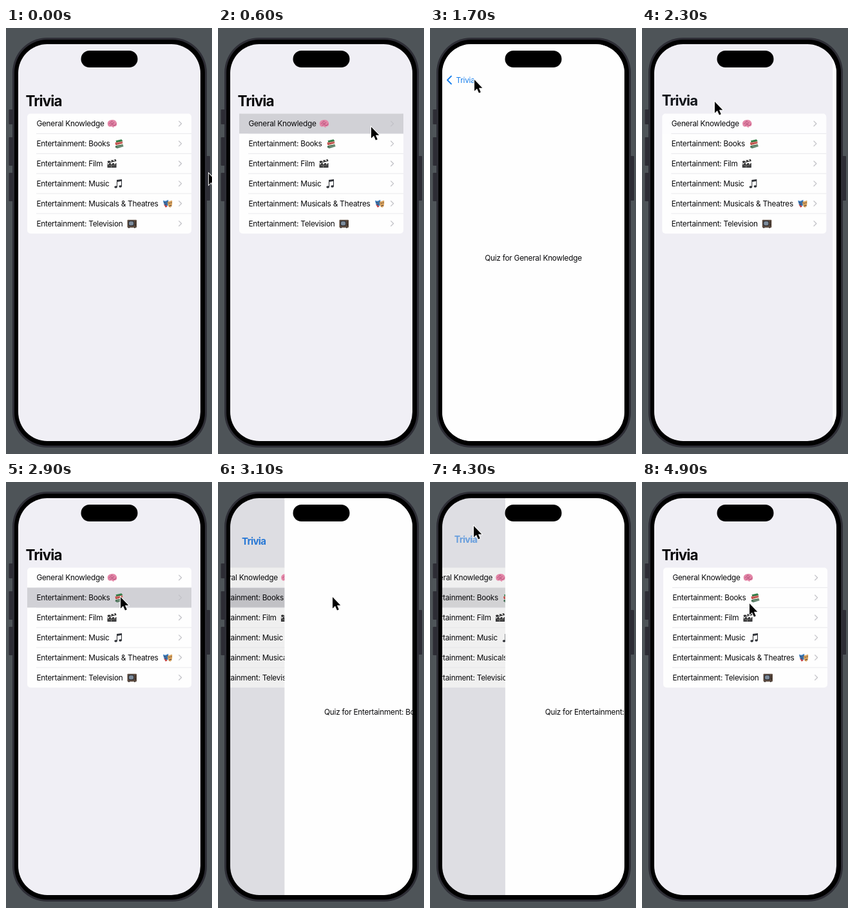
Animation of 320x659 px, one loop 5000 ms. Source, as an HTML page:

```html
<!DOCTYPE html>
<html lang="en">
<head>
<meta charset="utf-8">
<title>Trivia</title>
<style>
  html, body { margin: 0; width: 100%; height: 100%; overflow: hidden; background: #4e5458; }
  svg { display: block; width: 100%; height: 100%; }
  text { font: 400 11.8px Inter, "Liberation Sans", sans-serif; letter-spacing: -.24px; fill: #08080a; }
  #quizText { text-anchor: middle; }
  #large { font-weight: 700; font-size: 22.5px; letter-spacing: -.95px; }
  #back { fill: #147dec; }
  .line { fill: none; stroke-linecap: round; stroke-linejoin: round; }
</style>
</head>
<body>
<svg viewBox="0 0 320 659">
  <defs>
    <clipPath id="screen"><rect x="19" y="25" width="283" height="614" rx="45"/></clipPath>

    <g id="brain">
      <path d="M-7 1C-8-3-5-6-1-6C4-7 8-3 7 1C7 4 4 4 3 4L2 6L-1 4C-4 5-7 4-7 1Z" fill="#e487a8"/>
      <path class="line" d="M-5 0Q-3-3-1-1T3-2M-3 2Q0 0 2 2T6 0M-2-4Q0-5 1-3" stroke="#b04a75"/>
    </g>
    <g id="books">
      <path d="M-5-5L4-7L6-4L-4-2Z" fill="#33804a"/>
      <path d="M-6-2L5-4L6-1L-5 2Z" fill="#bd3f3c"/>
      <path d="M-4 2L6-1V2L-4 4Z" fill="#e2dccb"/>
      <path d="M-5 3L6 1L7 4L-3 7L-6 5Z" fill="#3d6a50"/>
      <path class="line" d="M-4-1L5-3M-3 5L6 3" stroke="#e6e0d0" stroke-width=".6"/>
    </g>
    <g id="film">
      <path d="M-7-4L6-7L7-4L-6-1Z" fill="#2c2c2e"/>
      <path d="M-7-1H7V6H-7Z" fill="#343436"/>
      <path d="M-4-5l2 2 2-.5-2-2zM1-6l2 2 2-.5-2-2zM-6-1l-1 2h2l1-2zM-1-1l-1 2h2l1-2zM4-1l-1 2h2l1-2z" fill="#eeeeea"/>
      <path class="line" d="M-5 3H5M-1 3V6" stroke="#a5a5a0" stroke-width=".7"/>
    </g>
    <g id="music" fill="#2f3238">
      <path d="M-2-6L6-7V4H5V-4L-1-3V5H-2Z"/>
      <ellipse cx="-3.4" cy="5" rx="2.3" ry="1.7"/>
      <ellipse cx="3.6" cy="4" rx="2.3" ry="1.7"/>
    </g>
    <g id="masks">
      <path d="M-7-5Q-3-3 1-6Q3 3-2 4Q-6 3-7-5Z" fill="#3c7fc0"/>
      <path d="M0-3Q4-4 7-5Q8 4 4 6Q0 5 0-3Z" fill="#dba45c"/>
      <path d="M-6 1L-3 6L0 4Z" fill="#c23c40"/>
      <path class="line" d="M-5-2l2 .4M-1-2.4l1-.4M-4 1Q-2 2-1 0M2-1l1 .3M5-1.4l1-.4M2.500 3.500Q4 1.500 6 3" stroke="#3a2830" stroke-width=".9"/>
    </g>
    <g id="tv">
      <rect x="-7" y="-6" width="14.500" height="12" rx="1" fill="#5e4c40"/>
      <rect x="-5.500" y="-4.500" width="9" height="8" rx="2" fill="#2c2e34"/>
      <rect x="-4.500" y="-3.500" width="7" height="6" rx="2" fill="#7d8c9c"/>
      <path class="line" d="M5.500-3v1M5.500 0v3M-5 6h1M4 6h1" stroke="#29221f" stroke-width="1.300"/>
    </g>
  </defs>

  <rect width="320" height="659" fill="#4e5458"/>
  <g fill="#2d2d35">
    <rect x="4.500" y="126" width="6" height="23" rx="1"/>
    <rect x="4.500" y="169" width="6" height="44" rx="1"/>
    <rect x="4.500" y="224" width="6" height="44" rx="1"/>
    <rect x="311" y="198" width="6" height="69" rx="1"/>
    <rect x="10" y="15" width="302" height="634" rx="54"/>
  </g>
  <rect x="13" y="18" width="296" height="628" rx="51"/>

  <g clip-path="url(#screen)">
    <rect id="bg" x="19" y="25" width="283" height="614"/>
    <g id="list">
      <rect id="card" x="33" y="132.500" width="255" height="185.400" rx="5"/>
      <rect id="press" x="33" width="255" height="30.900"/>
      <g id="rows"></g>
    </g>
    <g id="quiz">
      <rect x="19" y="25" width="283" height="614" fill="#fefefe"/>
      <text id="quizText" x="160.500" y="360"></text>
    </g>
    <path id="chevron" class="line" d="M33 74.500L27 80.500L33 86.500" stroke="#147dec" stroke-width="1.800"/>
    <g id="title">
      <text id="large">Trivia</text>
      <text id="back">Trivia</text>
    </g>
  </g>
  <rect x="116.500" y="35" width="88" height="26" rx="13"/>

  <path id="cursor" d="M0 0V17.500L4 13.700L7 20.500L9.800 19.300L6.900 12.700H12.300Z" stroke="#fff" stroke-width="1.800" paint-order="stroke"/>
</svg>

<script>
const $ = id => document.getElementById(id);
const LOOP = 5000, STEP = 100, WIDTH = 283, TOP = 132.5, PITCH = 30.9;

// label, icon, icon centre
const topics = [
  ['General Knowledge', 'brain', 165],
  ['Entertainment: Books', 'books', 175.5],
  ['Entertainment: Film', 'film', 164.5],
  ['Entertainment: Music', 'music', 174],
  ['Entertainment: Musicals &amp; Theatres', 'masks', 251],
  ['Entertainment: Television', 'tv', 195.5]
];

const visits = [
  { row: 0, push: 611, pop: 1976 },
  { row: 1, push: 2964, pop: 4232 }
];

// time, x, y, linear
const path = [
  [0, 315, 225], [450, 238, 153], [1000, 238, 153], [1550, 69, 80], [2050, 69, 80],
  [2300, 113, 114, 1], [2600, 178, 178, 1], [3250, 178, 178], [3800, 68, 68],
  [4700, 68, 68], [4800, 86, 89, 1], [4900, 167, 188, 1], [5000, 167, 188]
];

$('rows').innerHTML = topics.map(([label, icon, x], i) => {
  const y = TOP + PITCH * (i + .5);
  const rule = i ? `<path d="M47 ${y - PITCH / 2}H288" stroke="#e4e4e8" stroke-width=".8"/>` : '';
  return `${rule}<text x="47.4" y="${y + 4.2}">${label}</text>
    <use href="#${icon}" x="${x}" y="${y + .3}"/>
    <path class="line" d="M268.700 ${y - 3.8}l3.900 3.800l-3.900 3.800" stroke="#c3c3c8" stroke-width="1.300"/>`;
}).join('');

const mix = (a, b, u) => a + (b - a) * u;
const clamp = u => Math.min(1, Math.max(0, u));
const smooth = (a, b, v) => { const u = clamp((v - a) / (b - a)); return u * u * (3 - 2 * u); };
const blend = (a, b, u) => `rgb(${a.map((c, i) => Math.round(mix(c, b[i], u)))})`;
const set = (id, attrs) => { for (const k in attrs) $(id).setAttribute(k, attrs[k]); };

// Critically damped spring from 0 to 1
function spring(ms) {
  const u = Math.max(0, ms) * .018;
  return 1 - Math.exp(-u) * (1 + u);
}

function pointer(t) {
  const i = Math.max(1, path.findIndex(k => k[0] > t));
  const a = path[i - 1], b = path[i];
  const u = (t - a[0]) / (b[0] - a[0]);
  const e = b[3] ? u : smooth(0, 1, u);
  return [mix(a[1], b[1], e), mix(a[2], b[2], e)];
}

function drawTitle(q, popping) {
  const x = mix(30.5, 40.5, q), y = mix(121, 84.5, q);
  const place = s => `translate(${x} ${y}) scale(${s})`;
  set('title', { opacity: popping ? 1 - 1.8 * q * (1 - q) : 1 });
  set('large', {
    transform: place(mix(1, .49, q)),
    opacity: 1 - smooth(.7, .95, q)
  });
  $('large').style.fill = blend([8, 8, 10], [40, 122, 216], clamp(q * 1.5));
  set('back', { transform: place(mix(2.05, 1, q)), opacity: smooth(.65, .95, q) });
  set('chevron', {
    transform: `translate(${20 * (1 - q)} ${10 * (1 - q)})`,
    opacity: smooth(.75, .95, q)
  });
}

function draw(t) {
  const v = visits[t < 2700 ? 0 : 1];
  const shown = lag => spring(t - v.push - lag) - spring(t - v.pop - lag);
  const p = shown(0), popping = t >= v.pop;

  set('bg', { fill: blend([240, 239, 245], [213, 213, 218], p) });
  set('card', { fill: blend([254, 254, 254], [232, 232, 233], p) });
  set('list', { transform: `translate(${-.3 * WIDTH * p} 0)` });
  set('press', {
    y: TOP + PITCH * v.row,
    fill: blend([209, 209, 214], [186, 186, 190], p),
    opacity: popping ? p : t >= v.push - 100 ? 1 : 0
  });
  set('quiz', { transform: `translate(${WIDTH * (1 - p)} 0)` });
  $('quizText').textContent = 'Quiz for ' + topics[v.row][0];

  drawTitle(shown(11), popping);
  set('cursor', { transform: `translate(${pointer(t)})` });
}

function frame(now) {
  draw(Math.floor((now + 2) / STEP) * STEP % LOOP);
  requestAnimationFrame(frame);
}
draw(0);
requestAnimationFrame(frame);
</script>
</body>
</html>
```
